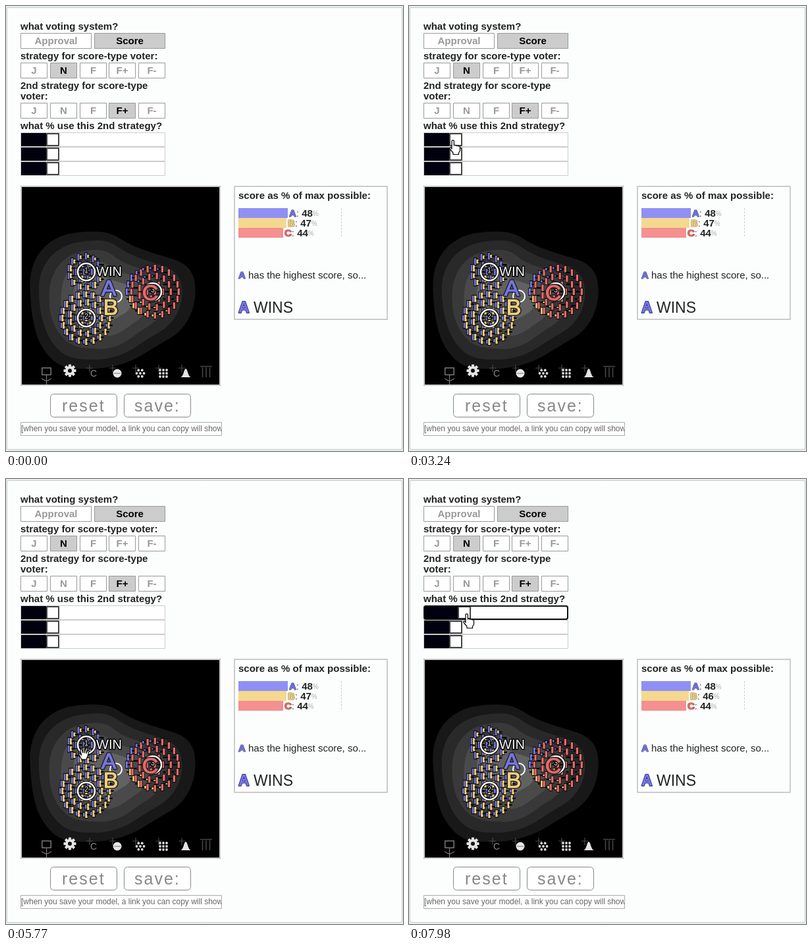
These frames come from a looping animation (603 px wide and 676 px high, 8 s). An HTML page with a canvas:

```html
<!DOCTYPE html>
<html lang="en">
<head>
<meta charset="utf-8">
<title>Voting sandbox</title>
<style>
html, body { margin: 0; width: 100%; height: 100%; overflow: hidden; background: #fcfefd; }
canvas { display: block; }
</style>
</head>
<body>
<canvas id="stage" width="603" height="676"></canvas>
<script>
const ctx = document.getElementById('stage').getContext('2d');
const LOOP = 8000, TAU = Math.PI * 2;
const SANS = '"Liberation Sans", Arial, sans-serif';

const candidates = {
  A: { x: 156, y: 428, color: '#7676e4', bar: '#9090f4', edge: '#35358c' },
  B: { x: 159, y: 457, color: '#f0d07c', bar: '#f4d890', edge: '#8c7740' },
  C: { x: 219, y: 435, color: '#ea6a6a', bar: '#f49090', edge: '#963c3c' }
};
const groups = [
  { x: 122, y: 404, rings: 2 },
  { x: 122, y: 474, rings: 3 },
  { x: 223, y: 434, rings: 3 }
];

// Pointer steps: time, shape, left, top
const pointerSteps = [
  [0, ''], [900, 'arrow', 136, 664], [1020, 'arrow', 134, 650], [1140, 'arrow', 131, 634],
  [1260, 'point', 127, 616], [1380, 'point', 125, 608],
  [1530, 'point', 122, 596], [1650, 'arrow', 112, 540],
  [1800, 'arrow', 101, 482], [1920, 'arrow', 89, 432], [2040, 'arrow', 79, 386], [2160, 'arrow', 71, 350],
  [2280, 'arrow', 66, 324], [2400, 'arrow', 58, 297], [2520, 'arrow', 52, 272],
  [2640, 'arrow', 48, 257], [2760, 'point', 45, 242], [2880, 'point', 47, 229], [3000, 'point', 52, 217],
  [3120, 'point', 57, 208], [3240, 'point', 61, 203], [4180, 'point', 67, 238],
  [4330, 'arrow', 84, 266], [4450, 'arrow', 105, 299], [4570, 'arrow', 127, 335], [4690, 'arrow', 146, 371],
  [4810, 'arrow', 158, 398], [4930, 'arrow', 161, 412], [5050, 'grab', 155, 414],
  [5170, 'grab', 154, 413], [5290, 'grab', 147, 404], [5410, 'grab', 137, 396], [5530, 'grab', 125, 391],
  [5650, 'grab', 114, 395], [5770, 'grab', 110, 406], [5890, 'grab', 113, 417],
  [6010, 'grab', 116, 413], [6130, 'grab', 116, 403], [6250, 'grab', 115, 391], [6370, 'grab', 114, 378],
  [6490, 'grab', 112, 364], [6610, 'arrow', 98, 307],
  [6760, 'arrow', 87, 276], [6880, 'point', 75, 238], [7000, 'point', 67, 209], [7150, 'point', 67, 204],
  [7740, 'point', 72, 204], [7860, 'point', 77, 204], [7980, 'point', 82, 204]
];
const handleSteps = [[0, 62], [7740, 66], [7860, 70], [7980, 75]];

const pointers = {
  arrow: new Path2D('M.5 .5V25L6.3 20l4 9 4-2-4-8.500h7.700z'),
  point: new Path2D('M4 14V2.500a1.700 1.700 0 0 1 3.400 0V9c.5-1 3-.9 3.200.4.8-.9 2.800-.6 3 .6 1-.8 2.900-.3 2.900 1.400V17l-2 3v2.500H6V20L1 14c-1-1.600 1-3 2.200-1.600z'),
  grab: new Path2D('M5 20L1 13c-.8-1.600 1-2.600 2-1.300l1.500 2L3 6c-.4-1.800 1.900-2.300 2.400-.6L7 10V2.500c0-1.800 2.400-1.800 2.400 0V10l1.500-6.500c.4-1.700 2.600-1.200 2.300.5L12 10.600l2-3.800c.8-1.500 2.700-.6 2 1L14 15l-2 5z')
};

const stepAt = (steps, t) => steps.findLast(step => step[0] <= t);

function rect(x, y, w, h, color) {
  ctx.fillStyle = color;
  ctx.fillRect(x, y, w, h);
}

function frame(x, y, w, h, color, width = 1, radius = 0) {
  ctx.strokeStyle = color;
  ctx.lineWidth = width;
  ctx.beginPath();
  ctx.roundRect(x + width / 2, y + width / 2, w - width, h - width, radius);
  ctx.stroke();
}

function disc(x, y, r, color) {
  ctx.fillStyle = color;
  ctx.beginPath();
  ctx.arc(x, y, r, 0, TAU);
  ctx.fill();
}

function ring(x, y, r, width, color) {
  ctx.strokeStyle = color;
  ctx.lineWidth = width;
  ctx.beginPath();
  ctx.arc(x, y, r, 0, TAU);
  ctx.stroke();
}

function lines(color, width, ...paths) {
  ctx.strokeStyle = color;
  ctx.lineWidth = width;
  ctx.beginPath();
  for (const [x1, y1, x2, y2] of paths) {
    ctx.moveTo(x1, y1);
    ctx.lineTo(x2, y2);
  }
  ctx.stroke();
}

// Returns the x position after the text.
function text(str, x, y, { size = 15, weight = '', color = '#222', align = 'left', edge, edgeWidth = 2, spacing = 0 } = {}) {
  ctx.font = `${weight} ${size}px ${SANS}`;
  ctx.textAlign = align;
  ctx.letterSpacing = spacing + 'px';
  if (edge) {
    ctx.strokeStyle = edge;
    ctx.lineWidth = edgeWidth;
    ctx.strokeText(str, x, y);
  }
  ctx.fillStyle = color;
  ctx.fillText(str, x, y);
  const end = x + ctx.measureText(str).width;
  ctx.letterSpacing = '0px';
  return end;
}

const label = (str, x, y) => text(str, x, y, { weight: 'bold' });

function choices(names, chosen, y) {
  const count = names.length, w = (220 - 4 * (count - 1)) / count;
  names.forEach((name, i) => {
    const x = Math.round(22 + i * (w + 4)), width = Math.round(w), on = name === chosen;
    rect(x, y, width, 24, on ? '#ccc' : '#fff');
    frame(x, y, width, 24, '#999');
    text(name, x + width / 2, y + 17, { weight: 'bold', align: 'center', color: on ? '#000' : '#999' });
  });
}

function slider(y, handle, focused) {
  rect(22, y, 220, 22, '#fff');
  frame(22, y, 220, 22, '#ccc');
  rect(23, y + 1, handle - 23, 20, '#00000f');
  rect(handle - 1, y + 1, 20, 20, '#fff');
  frame(handle - 1, y + 1, 20, 20, '#444', 2);
  if (focused) frame(22, y, 220, 22, '#101010', 2, 3);
}

function controls(t) {
  label('what voting system?', 22, 36);
  choices(['Approval', 'Score'], 'Score', 41);
  label('strategy for score-type voter:', 22, 81);
  choices(['J', 'N', 'F', 'F+', 'F-'], 'N', 86);
  label('2nd strategy for score-type', 22, 126);
  label('voter:', 22, 142);
  choices(['J', 'N', 'F', 'F+', 'F-'], 'F+', 147);
  label('what % use this 2nd strategy?', 22, 187);
  slider(192, stepAt(handleSteps, t)[1], t >= 7460);
  slider(214, 62);
  slider(236, 62);
}

function terrain() {
  const radii = [150, 137, 113, 109, 107, 108, 118, 114, 107, 104, 110, 115, 113, 106, 104, 94, 107, 152];
  const bands = [[1, '#181818'], [0.86, '#292929'], [0.71, '#393939'], [0.55, '#4a4a4a'], [0.36, '#626262']];
  for (const [scale, color] of bands) {
    const pts = radii.map((r, i) => {
      const a = i * TAU / radii.length, reach = r * scale + 1.5 * Math.sin(i * 5 + scale * 9);
      return [140 + Math.cos(a) * reach, 445 + Math.sin(a) * reach];
    });
    const middle = i => {
      const p = pts[i % pts.length], q = pts[(i + 1) % pts.length];
      return [(p[0] + q[0]) / 2, (p[1] + q[1]) / 2];
    };
    ctx.fillStyle = color;
    ctx.beginPath();
    ctx.moveTo(...middle(pts.length - 1));
    pts.forEach((p, i) => ctx.quadraticCurveTo(...p, ...middle(i)));
    ctx.fill();
  }
}

// Three centred bars, one per candidate, scored by normalised distance.
function voter(x, y, strategic) {
  const list = Object.values(candidates);
  const dist = list.map(c => Math.hypot(c.x - x, c.y - y));
  const far = Math.max(...dist), near = Math.min(...dist);
  list.forEach((c, i) => {
    let score = (far - dist[i]) / (far - near);
    if (strategic) score = Math.round(score);
    const h = 10 * score, left = x - 5 + i * 3.3;
    rect(left - 0.7, y - h / 2 - 1, 4.7, h + 2, '#000');
    rect(left, y - h / 2, 3.3, h, c.color);
  });
}

function voters() {
  for (const g of groups) {
    voter(g.x, g.y, false);
    for (let k = 1; k <= g.rings; k++) {
      const r = 12 * k, count = Math.floor(TAU * r / 11);
      for (let j = 0; j < count; j++) {
        const a = TAU * j / count;
        voter(g.x + r * Math.cos(a), g.y + r * Math.sin(a), j % 5 === 2);
      }
    }
  }
}

function markers() {
  ring(167, 441, 9, 2, '#fff');
  groups.forEach((g, i) => {
    ring(g.x, g.y, 13, 4.5, '#000');
    ring(g.x, g.y, 13, 2.5, '#fff');
    text(i + 1, g.x, g.y + 0.5, { size: 10, align: 'center', color: '#fff', edge: '#000', edgeWidth: 3 });
  });
  for (const [name, c] of Object.entries(candidates)) {
    text(name, c.x, c.y + 12, { size: 34, align: 'center', color: c.color, edge: '#222', edgeWidth: 4 });
    ctx.strokeStyle = c.color;
    ctx.lineWidth = 1;
    ctx.strokeText(name, c.x, c.y + 12);
  }
  text('WIN', 137, 409.5, { size: 20, color: '#fff', edge: '#000', edgeWidth: 3 });
}

function tools() {
  frame(54, 549, 15, 12, '#777', 1.5);
  lines('#777', 1.3, [61.5, 561, 61.5, 575], [61.5, 570, 54, 566], [61.5, 570, 69, 566]);

  for (let i = 0; i < 8; i++) {
    const a = i * TAU / 8;
    lines('#e4e4e4', 4, [97, 554, 97 + 9.5 * Math.cos(a), 554 + 9.5 * Math.sin(a)]);
  }
  disc(97, 554, 7, '#e4e4e4');
  disc(97, 554, 3, '#111');

  for (let x = 127; x < 270; x += 35) lines('#484848', 1.2, [x - 5, 550, x + 5, 550], [x, 545, x, 556]);
  text('C', 133, 563, { size: 14, align: 'center', color: '#888' });
  disc(169, 558, 6.5, '#e8e8e8');
  lines('#777', 1, [164, 558, 174, 558]);
  disc(204, 558, 1.9, '#ddd');
  for (let i = 0; i < 6; i++) disc(204 + 5.5 * Math.cos(i * TAU / 6), 558 + 5.5 * Math.sin(i * TAU / 6), 1.9, '#ddd');
  for (let i = 0; i < 9; i++) disc(234 + (i % 3) * 5, 553 + Math.floor(i / 3) * 5, 1.9, '#ddd');
  ctx.fillStyle = '#e4e4e4';
  ctx.fill(new Path2D('M265 564C270 563 270 551 273 551S276 563 281 564z'));
  lines('#484848', 1.5, [295, 547.5, 313, 547.5], [298.5, 549, 298.5, 564], [304, 549, 304, 564], [309.5, 549, 309.5, 564]);
}

function arena() {
  rect(22, 273, 304, 304, '#000');
  terrain();
  voters();
  markers();
  tools();
  frame(22, 273, 304, 304, '#ccc', 2);
}

function initial(name, x, y, size = 15) {
  const { color, edge } = candidates[name];
  return text(name, x, y, { size, weight: 'bold', color, edge, edgeWidth: size > 20 ? 2 : 1.2 });
}

function results(t) {
  const late = t >= 7980;
  frame(346, 273, 234, 204, '#ccc', 2);
  label('score as % of max possible:', 353, 293);
  const rows = [['A', 48, 75], late ? ['B', 46, 72] : ['B', 47, 73], ['C', 44, 68]];
  rows.forEach(([name, score, width], i) => {
    const y = 307 + i * 15;
    rect(353, y, width, 15, candidates[name].bar);
    let x = initial(name, 355 + width, y + 13);
    x = text(': ', x, y + 13, { color: '#555' });
    x = text(score, x, y + 13, { weight: 'bold' });
    text('%', x, y + 12, { size: 10, color: '#aaa' });
  });
  ctx.setLineDash([3, 2]);
  lines('#ccc', 1, [509.5, 307, 509.5, 352]);
  ctx.setLineDash([]);
  text(' has the highest score, so...', initial('A', 353, 414), 414);
  text(' WINS', initial('A', 353, 466, 23), 466, { size: 23 });
}

function footer() {
  for (const [name, x] of [['reset', 67], ['save:', 179]]) {
    rect(x + 2, 591, 98, 32, '#fff');
    frame(x, 589, 102, 36, '#888', 1, 5);
    text(name, x + (name === 'reset' ? 18 : 16), 616, { size: 25, color: '#888', spacing: 2 });
  }
  rect(22, 632, 306, 21, '#fff');
  ctx.save();
  ctx.beginPath();
  ctx.rect(23, 633, 304, 19);
  ctx.clip();
  text('[when you save your model, a link you can copy will show here]', 23, 646, { size: 12, color: '#666' });
  ctx.restore();
  frame(22, 632, 306, 21, '#aaa');
}

function pointer(t) {
  const [, shape, x, y] = stepAt(pointerSteps, t);
  if (!shape) return;
  const dark = shape === 'arrow';
  ctx.save();
  ctx.translate(x, y);
  ctx.lineWidth = 1.2;
  ctx.fillStyle = dark ? '#000' : '#fff';
  ctx.strokeStyle = dark ? '#fff' : '#000';
  ctx.fill(pointers[shape]);
  ctx.stroke(pointers[shape]);
  ctx.restore();
}

function draw(t) {
  ctx.lineJoin = 'round';
  rect(0, 0, 603, 676, '#e9efee');
  rect(1, 2, 601, 672, '#fcfefd');
  frame(1, 2, 601, 672, '#c6cfce');
  controls(t);
  arena();
  results(t);
  footer();
  pointer(t);
}

function tick() {
  draw(performance.now() % LOOP);
  requestAnimationFrame(tick);
}
tick();
</script>
</body>
</html>
```
